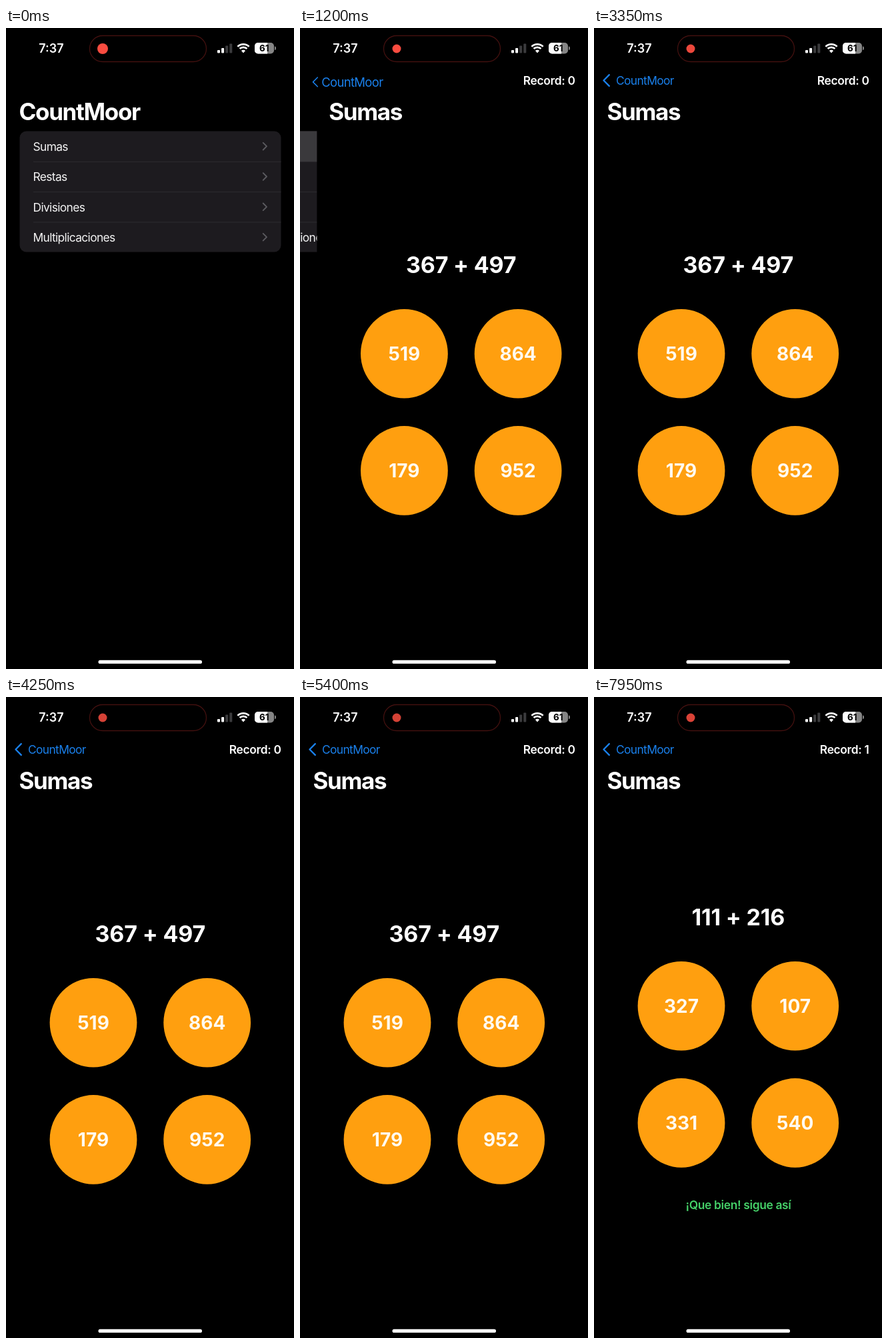
Write an HTML page with a canvas that moves like this. It is 432x960 px and loops after 8000 ms.

```html
<!DOCTYPE html>
<html lang="es">
<head>
<meta charset="utf-8">
<title>CountMoor</title>
<style>
html, body { margin: 0; width: 100%; height: 100%; overflow: hidden; background: #000; }
canvas { display: block; width: 432px; height: 960px; }
</style>
</head>
<body>
<canvas id="stage"></canvas>
<script>
const W = 432, H = 960, LOOP = 8000;
const APP = 'CountMoor';
const ROWS = ['Sumas', 'Restas', 'Divisiones', 'Multiplicaciones'];
const ROUNDS = [
  { sum: '367 + 497', options: [519, 864, 179, 952], score: 0, dy: 0 },
  { sum: '111 + 216', options: [327, 107, 331, 540], score: 1, dy: -25 }
];
const TAP = 950, RESUME = 1100, ANSWER = 5450;
const BLUE = '#1a80ec', ORANGE = '#ff9f0f';

const canvas = document.getElementById('stage');
const ctx = canvas.getContext('2d');
const dpr = window.devicePixelRatio || 1;
canvas.width = W * dpr;
canvas.height = H * dpr;

function text(str, x, y, { size = 17.4, weight = 400, color = '#fff', align = 'left', track = 0 } = {}) {
  ctx.font = `${weight} ${size}px Inter, sans-serif`;
  ctx.letterSpacing = track + 'px';
  ctx.textAlign = align;
  ctx.fillStyle = color;
  ctx.fillText(str, x, y);
}

function pill(x, y, w, h, r, color) {
  ctx.fillStyle = color;
  ctx.beginPath();
  ctx.roundRect(x, y, w, h, r);
  ctx.fill();
}

// Chevron with its tip at x; dir 1 points right, -1 left.
function chevron(x, y, half, dir, width, color) {
  ctx.strokeStyle = color;
  ctx.lineWidth = width;
  ctx.lineCap = ctx.lineJoin = 'round';
  ctx.beginPath();
  ctx.moveTo(x - dir * half, y - half);
  ctx.lineTo(x, y);
  ctx.lineTo(x - dir * half, y + half);
  ctx.stroke();
}

const mix = (a, b, p) => a + (b - a) * p;

// Share of the push still to go: critically damped spring with a short stall.
function pushLeft(t) {
  if (t < TAP) return 1;
  const k = 0.01826 * (t < RESUME ? 47 : t - 952);
  return (1 + k) * Math.exp(-k);
}

function drawList(dx, pressed) {
  ctx.save();
  ctx.translate(dx, 0);
  ctx.beginPath();
  ctx.roundRect(20.5, 154.5, 392, 181, 10);
  ctx.clip();
  ctx.fillStyle = '#1d1b1f';
  ctx.fillRect(20, 154, 393, 182);
  if (pressed) {
    ctx.fillStyle = '#3a393c';
    ctx.fillRect(20, 154, 393, 46);
  }
  ROWS.forEach((label, i) => {
    const y = 177.5 + i * 45.3;
    if (i) {
      ctx.fillStyle = '#2d2c30';
      ctx.fillRect(41, y - 23, 372, 1);
    }
    text(label, 40.5, y + 6.5, { track: -0.65, color: '#f4f4f4' });
    chevron(391, y - 0.3, 5.3, 1, 1.9, '#5b5a5f');
  });
  ctx.restore();
}

function drawGame(round, dx) {
  ctx.save();
  ctx.translate(dx, 0);
  ctx.fillStyle = '#000';
  ctx.fillRect(0, 150, W, H);
  ctx.translate(0, round.dy);
  text(round.sum, 216.3, 367, { size: 34, weight: 700, align: 'center', track: -0.2 });
  round.options.forEach((n, i) => {
    const x = 131 + (i % 2) * 170.7, y = 487.7 + (i >> 1) * 175.2;
    ctx.fillStyle = ORANGE;
    ctx.beginPath();
    ctx.ellipse(x, y, 65.4, 66.8, 0, 0, 7);
    ctx.fill();
    text(n, x, y + 10, { size: 28, weight: 700, align: 'center', color: '#fffaf0' });
  });
  ctx.restore();
  if (round.score) {
    text('¡Que bien! sigue así', 216.5, 767, { weight: 600, align: 'center', color: '#45d068', track: -0.35 });
  }
}

// The large title shrinks into the back button while the next title slides in.
function drawNav(round, left) {
  const p = 1 - left;
  const big = { size: 35, weight: 700, track: -1.35 };
  const layer = (scale, alpha, style) => {
    ctx.save();
    ctx.globalAlpha = alpha;
    ctx.translate(mix(19.5, 33, p), mix(138, 84.5, p));
    ctx.scale(scale, scale);
    text(APP, 0, 0, style);
    ctx.restore();
  };
  const fade = Math.min(1, p * 1.2);
  if (fade < 1) layer(mix(1, 0.475, p), 1 - fade, big);
  if (p > 0) {
    layer(mix(2.1, 1, p), fade, { color: BLUE, track: -0.65 });
    ctx.globalAlpha = fade;
    chevron(14.5 + 85 * left, 78.5 + 40 * left, 8.3 - 25 * Math.min(left, 0.06), -1, 2.4 - 15 * Math.min(left, 0.06), BLUE);
    text('Record: ' + round.score, 412.5, 85, { weight: 600, align: 'right', track: -0.35 });
    ctx.globalAlpha = 1;
    text('Sumas', 19.5 + 402 * left, 138, big);
  }
}

function drawStatus(t) {
  text('7:37', 68, 37, { size: 18, weight: 600, align: 'center' });

  ctx.fillStyle = '#000';
  ctx.strokeStyle = '#42100f';
  ctx.lineWidth = 1.3;
  ctx.beginPath();
  ctx.roundRect(125.5, 11.5, 175, 39, 19.5);
  ctx.fill();
  ctx.stroke();
  const glow = 0.5 + 0.5 * Math.cos(t / 1200 * 2 * Math.PI);
  ctx.fillStyle = `rgb(${mix(212, 250, glow)}, ${mix(66, 76, glow)}, ${mix(54, 64, glow)})`;
  ctx.beginPath();
  ctx.arc(145, 31, mix(8, 6.5, Math.min(1, t / 400)), 0, 7);
  ctx.fill();

  [4.5, 7.5, 11, 14].forEach((h, i) =>
    pill(317 + i * 6.1, 37.5 - h, 4, h, 1, i < 2 ? '#fff' : '#3b3b3d'));

  ctx.strokeStyle = '#fff';
  ctx.lineCap = 'butt';
  ctx.lineWidth = 2.7;
  for (const r of [12.2, 7.7]) {
    ctx.beginPath();
    ctx.arc(356, 36.5, r, -Math.PI * 0.75, -Math.PI * 0.25);
    ctx.stroke();
  }
  ctx.fillStyle = '#fff';
  ctx.beginPath();
  ctx.moveTo(356, 37.5);
  ctx.arc(356, 37, 4.3, -Math.PI * 0.75, -Math.PI * 0.25);
  ctx.fill();

  ctx.save();
  ctx.beginPath();
  ctx.roundRect(373, 22, 29, 16.5, 5);
  ctx.clip();
  ctx.fillStyle = '#858585';
  ctx.fillRect(373, 22, 29, 17);
  ctx.fillStyle = '#fff';
  ctx.fillRect(373, 22, 19, 17);
  ctx.restore();
  pill(403, 27.5, 2, 5.5, [0, 2, 2, 0], '#858585');
  text('61', 387.3, 35.2, { size: 13.5, weight: 700, align: 'center', color: '#000' });
}

function draw(t) {
  const left = pushLeft(t);
  const round = ROUNDS[t < ANSWER ? 0 : 1];
  ctx.setTransform(dpr, 0, 0, dpr, 0, 0);
  ctx.fillStyle = '#000';
  ctx.fillRect(0, 0, W, H);
  if (left > 0.001) drawList(-130 * (1 - left), t >= TAP);
  if (left < 1) drawGame(round, W * left);
  drawNav(round, left);
  drawStatus(t);
  pill(138.5, 946.7, 155.5, 5.4, 2.7, '#fff');
}

const start = performance.now();
function tick() {
  draw((performance.now() - start) % LOOP);
  requestAnimationFrame(tick);
}
tick();
</script>
</body>
</html>
```
